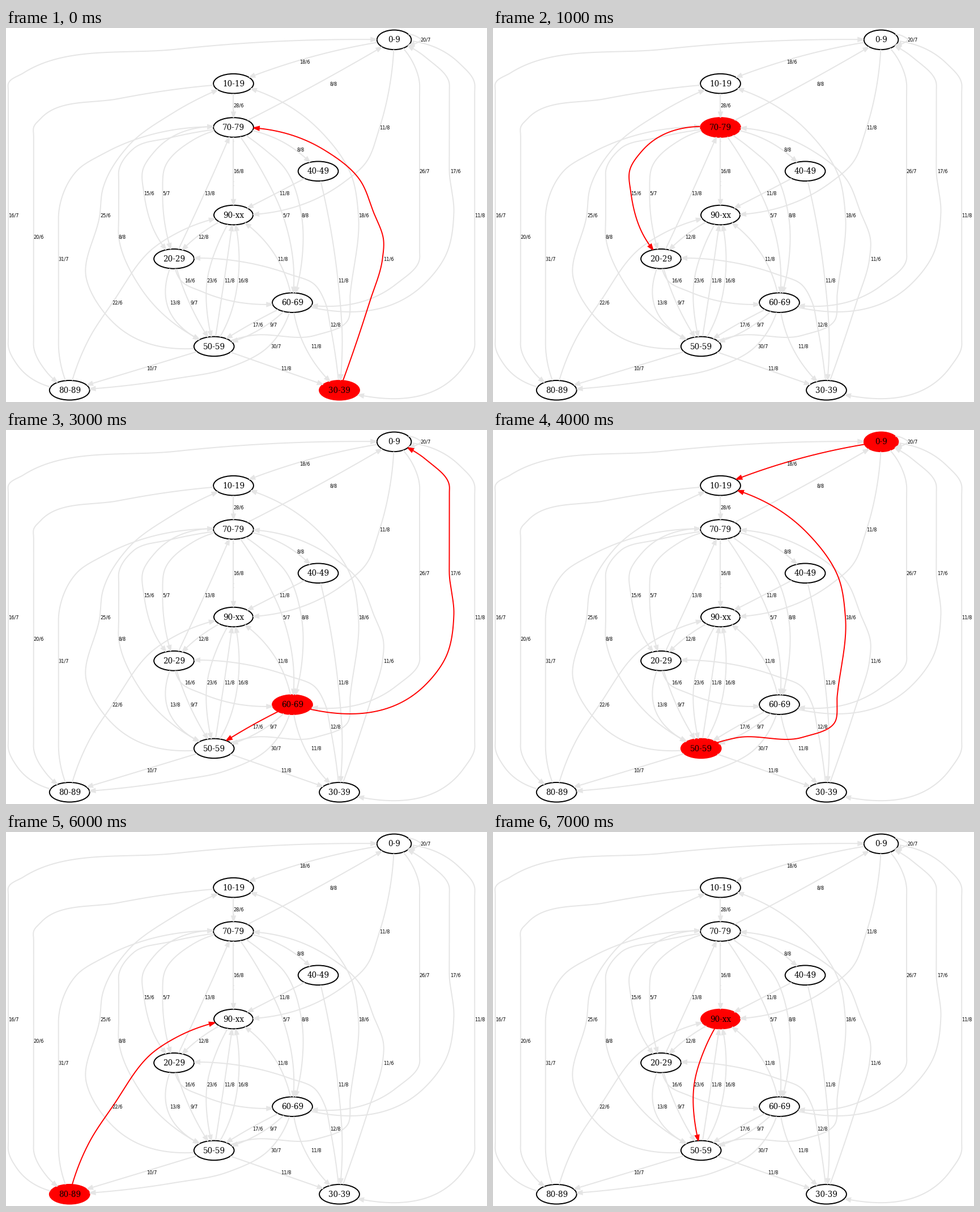
A matplotlib script for the animation above (8 s loop, 849x660 px).

```python
import numpy as np
import matplotlib.pyplot as plt
from matplotlib.animation import FuncAnimation
from matplotlib.patches import Ellipse, Polygon

W, H, DPI = 849, 660, 96
PT = 72 / DPI               # points per pixel
GREY, RED = "#e5e5e5", "#ff0000"
PEN = 1.95
HEAD_LEN, HEAD_HALF = 9.7, 3.4
DAYS = [f"{d}/6" for d in (11, 15, 16, 17, 18, 20, 22, 23)]

plt.rcParams["toolbar"] = "None"
fig = plt.figure(figsize=(W / DPI, H / DPI), dpi=DPI, facecolor="white")
ax = fig.add_axes([0, 0, 1, 1])
ax.set_xlim(-0.5, W - 0.5)
ax.set_ylim(H - 0.5, -0.5)
ax.axis("off")

nodes, edges = {}, []


def rank_y(rank):
    return 20.35 + 77.3 * rank


def put_text(x, y, text, size, family, ha):
    ax.text(x, y + 0.365 * size, text, fontsize=size * PT, family=family,
            ha=ha, va="baseline", color="black", zorder=5)


def node(name, x, rank, rx=35.4):
    y, ry = rank_y(rank), 17.3
    shape = Ellipse((x, y), 2 * rx, 2 * ry, lw=PEN * PT, zorder=1)
    ax.add_patch(shape)
    put_text(x, y - 0.3, name, 13.5, "DejaVu Serif", "center")
    nodes[name] = rank, np.array([x, y]), np.array([rx, ry]), shape


def smooth(pts, steps=150):
    """Smooth curve through points, parametrised by chord length."""
    p = np.array(pts, float)
    h = np.hypot(*np.diff(p, axis=0).T)[:, None]
    d = np.diff(p, axis=0) / h
    m = (h[1:] * d[:-1] + h[:-1] * d[1:]) / (h[1:] + h[:-1])
    m = np.vstack([2 * d[0] - m[0], m, 2 * d[-1] - m[-1]])
    t = np.linspace(0, 1, steps)[:, None]
    return np.vstack([
        (2 * t**3 - 3 * t**2 + 1) * p[i] + (3 * t**2 - 2 * t**3) * p[i + 1]
        + h[i] * ((t**3 - 2 * t**2 + t) * m[i] + (t**3 - t**2) * m[i + 1])
        for i in range(len(h))])


def edge(tail, head, label, lane, *via, straight=None, gap=None):
    """Join two nodes by way of a lane that carries the label halfway.

    straight: ranks between which the lane runs vertically
    gap: distance from lane to label; slanted short edges get one by slope
    """
    rank_a, a, ra, _ = nodes[tail]
    rank_b, b, rb, _ = nodes[head]
    mid = (a[1] + b[1]) / 2
    pts = [(lane, mid), *via]
    if straight:
        top, low = straight
        pts += [(lane, rank_y(r)) for r in (top, top + 0.2, low - 0.2, low)]
    pts.sort(key=lambda p: p[1], reverse=rank_a > rank_b)

    # run from centre to centre, then cut off what lies inside the nodes
    curve = smooth([a, *pts, b])
    out = [np.hypot(*((curve - c) / r).T) >= 1 for c, r in ((a, ra), (b, rb))]
    curve = curve[out[0] & out[1]]
    tip = curve[-1]
    curve = curve[np.hypot(*(curve - tip).T) > HEAD_LEN]
    u = (tip - curve[-1]) / np.hypot(*(tip - curve[-1]))
    base = tip - u * HEAD_LEN
    side = np.array([-u[1], u[0]]) * HEAD_HALF

    line, = ax.plot(*np.vstack([curve, base]).T, lw=PEN * PT,
                    solid_capstyle="butt")
    arrow = Polygon([tip, base + side, base - side], lw=PEN * PT,
                    joinstyle="miter")
    ax.add_patch(arrow)
    if gap is None:
        dx, dy = abs(b - a)
        gap = 2.4 * dx / dy if abs(rank_a - rank_b) == 1 else 0
    put_text(lane + gap - 0.2, mid, label, 8.2, "DejaVu Sans", "left")
    edges.append((tail, label, line, arrow))


node("0-9", 684.6, 0, 30.3)
node("10-19", 401, 1)
node("70-79", 401, 2)
node("40-49", 550.6, 3)
node("90-xx", 401, 4, 34.5)
node("20-29", 296, 5)
node("60-69", 505, 6)
node("50-59", 366.7, 7)
node("80-89", 111.7, 8)
node("30-39", 588, 8)

edge("0-9", "0-9", "20/7", 731.5, (721, 13), (721, 27.5))
edge("0-9", "10-19", "18/6", 509)
edge("0-9", "90-xx", "11/8", 659, (680, 80), (634, 238), (597, 271))
edge("0-9", "60-69", "26/7", 729.5, (717, 59), (690, 450), straight=(1, 5))
edge("0-9", "30-39", "11/8", 826.7, (800, 62), (808, 596), straight=(1, 7))
edge("10-19", "80-89", "20/6", 48.3, (200, 124), (62, 158), (70, 605),
     straight=(2, 7))
edge("10-19", "70-79", "28/6", 401)
edge("70-79", "0-9", "8/8", 549, gap=22)
edge("70-79", "40-49", "8/8", 509)
edge("70-79", "90-xx", "16/8", 401)
edge("70-79", "60-69", "5/7", 488, (450, 250), (507, 420))
edge("70-79", "60-69", "8/8", 521, (455, 213), (490, 245), (522, 407))
edge("70-79", "20-29", "15/6", 243, (262, 217), (241, 250), (266, 367))
edge("70-79", "20-29", "5/7", 276, (330, 197), (280, 245), (283, 362))
edge("70-79", "50-59", "8/8", 198.5, (290, 193), (225, 212), (235, 455),
     straight=(3, 4))
edge("40-49", "90-xx", "11/8", 477)
edge("40-49", "30-39", "11/8", 585.5, (570, 340), (593, 561))
edge("90-xx", "20-29", "12/8", 336)
edge("90-xx", "50-59", "23/6", 354.5, (375, 378), (357, 520))
edge("20-29", "70-79", "13/8", 350)
edge("20-29", "60-69", "16/6", 308.5, (345, 464.5))
edge("20-29", "50-59", "13/8", 283, gap=6)
edge("20-29", "50-59", "9/7", 323, gap=2.5)
edge("60-69", "0-9", "17/6", 782, (738, 451), (776, 400), (790, 325),
     (745, 55), straight=(1, 2.7), gap=1.5)
edge("60-69", "90-xx", "11/8", 478.5)
edge("60-69", "50-59", "17/6", 430)
edge("60-69", "50-59", "9/7", 461)
edge("60-69", "80-89", "30/7", 463, (390, 600), (300, 618), gap=4)
edge("60-69", "30-39", "11/8", 527, gap=11)
edge("50-59", "10-19", "25/6", 165, (195, 525), (141, 440), (170, 285),
     (215, 208), (290, 152), gap=1.5)
edge("50-59", "10-19", "18/6", 621.5, (430, 542.5), (545, 542), (603, 515),
     (607, 470), (610, 262), (555, 182))
edge("50-59", "90-xx", "11/8", 384.5)
edge("50-59", "90-xx", "16/8", 408.8, (393, 512), (411, 407))
edge("50-59", "80-89", "10/7", 240)
edge("50-59", "30-39", "11/8", 477.5)
edge("80-89", "0-9", "16/7", 3.6, (18, 592), (30, 79), (300, 37),
     straight=(1, 7))
edge("80-89", "70-79", "31/7", 92.3, (126, 250), (170, 222), straight=(4, 7))
edge("80-89", "90-xx", "22/6", 187.5, (146, 548), (262, 386), (300, 362))
edge("30-39", "70-79", "11/6", 664, (641, 484), (666, 375), (648, 324),
     (625, 269), (560, 214), gap=1.5)
edge("30-39", "20-29", "12/8", 571.5, (563, 484), (545, 453), (500, 434))


def update(i):
    """Light up the moves of one day and the nodes they leave from."""
    day = DAYS[i % len(DAYS)]
    active = {tail for tail, label, *_ in edges if label == day}
    for name, (*_, shape) in nodes.items():
        on = name in active
        shape.set_facecolor(RED if on else "white")
        shape.set_edgecolor(RED if on else "black")
    for _, label, *parts in edges:
        for part in parts:
            part.set_color(RED if label == day else GREY)
            part.set_zorder(4 if label == day else 3)
    return []


anim = FuncAnimation(fig, update, frames=len(DAYS), init_func=lambda: [],
                     interval=1000, repeat=True, repeat_delay=0, blit=False)
plt.show()
```
